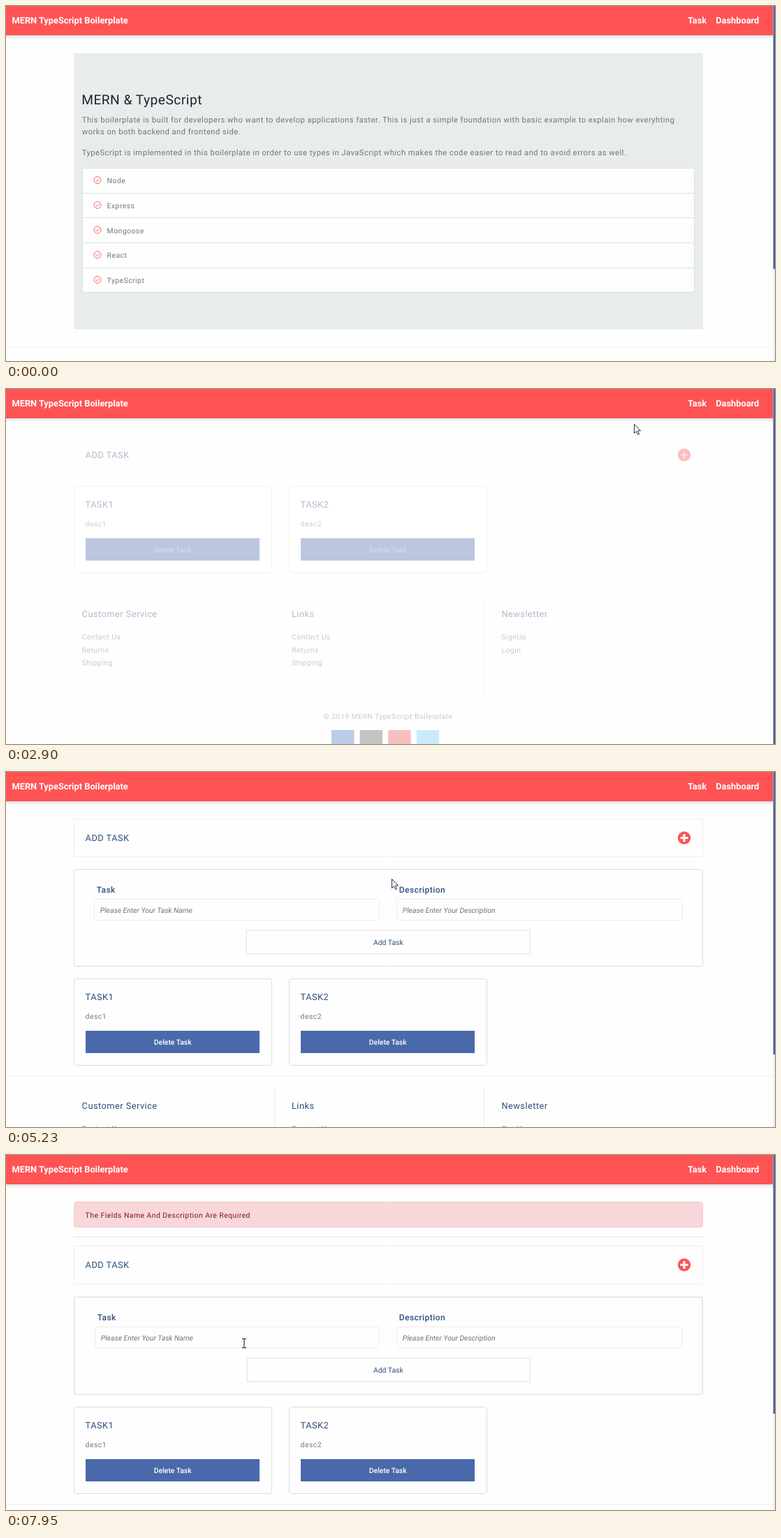
An HTML page with a canvas that plays this animation: 1101x509 px, repeating every 8 s.

```html
<!DOCTYPE html>
<html lang="en">
<head>
<meta charset="utf-8">
<title>MERN TypeScript Boilerplate</title>
<style>
html, body { margin: 0; width: 100%; height: 100%; overflow: hidden; background: #fefefe; }
canvas { display: block; width: 1101px; height: 509px; }
</style>
</head>
<body>
<canvas id="stage" width="1101" height="509"></canvas>
<script>
const ctx = document.getElementById('stage').getContext('2d');
const LOOP = 8000;
const RED = '#ff5354', BLUE = '#4a69ab', NAVY = '#2d4f7c', GRAY = '#757575';
const SPACING = 0.47;

// Moments when the page changes
const PAGE_AT = 2810, FORM_AT = 5090, FORM_SET = 5320, HOVER_AT = 6710, ALERT_AT = 7170;
const CLICKS = [[2450, 2590], [4940, 5020], [5780, 5860], [6940, 7010]];
const CARET = [5860, 6400];

// Pointer legs: first step, last step, number of steps, way points
const LEGS = [
  [260, 650, 6, [[993, 516], [499, 278]]],
  [1030, 1810, 11, [[499, 278], [770, 172], [1019, 74], [1004, 50]]],
  [1890, 2270, 6, [[1004, 50], [990, 26]]],
  [2730, 3520, 11, [[990, 26], [740, 92], [470, 130]]],
  [3680, 3680, 1, [[470, 130], [582, 136]]],
  [3760, 4460, 10, [[582, 136], [958, 101]]],
  [4530, 4764, 4, [[958, 101], [971, 97]]],
  [5090, 5230, 3, [[971, 97], [552, 153]]],
  [5320, 5320, 1, [[552, 153], [498, 162]]],
  [5390, 5700, 5, [[498, 162], [297, 195]]],
  [6550, 6710, 3, [[297, 195], [539, 234]]],
  [7250, 7950, 10, [[539, 234], [341, 270]]]
];

const clamp = v => Math.max(0, Math.min(1, v));
const ramp = (t, from, to) => clamp((t - from) / (to - from));
const smooth = p => p * p * (3 - 2 * p);
const within = (t, [from, to]) => t >= from && t < to;

function text(str, x, y, size, color, { weight = 400, spacing = SPACING, align = 'left', italic = false } = {}) {
  ctx.font = `${italic ? 'italic ' : ''}${weight} ${size}px Roboto, sans-serif`;
  ctx.letterSpacing = spacing + 'px';
  ctx.textAlign = align;
  ctx.fillStyle = color;
  ctx.fillText(str, x, y);
}

function rect(x, y, w, h, color) {
  ctx.fillStyle = color;
  ctx.fillRect(x, y, w, h);
}

function box(x, y, w, h, stroke, { fill = null, radius = 0, line = 1 } = {}) {
  ctx.beginPath();
  ctx.roundRect(x + line / 2, y + line / 2, w - line, h - line, radius);
  if (fill) { ctx.fillStyle = fill; ctx.fill(); }
  ctx.lineWidth = line;
  ctx.strokeStyle = stroke;
  ctx.stroke();
}

function disc(x, y, r, color) {
  ctx.beginPath();
  ctx.arc(x, y, r, 0, Math.PI * 2);
  ctx.fillStyle = color;
  ctx.fill();
}

function polyline(points, color, width) {
  ctx.beginPath();
  points.forEach(([x, y]) => ctx.lineTo(x, y));
  ctx.strokeStyle = color;
  ctx.lineWidth = width;
  ctx.stroke();
}

function faded(alpha, draw) {
  ctx.save();
  ctx.globalAlpha *= alpha;
  draw();
  ctx.restore();
}

function navbar() {
  const shade = ctx.createLinearGradient(0, 42, 0, 48);
  shade.addColorStop(0, 'rgba(0,0,0,0.11)');
  shade.addColorStop(1, 'rgba(0,0,0,0)');
  rect(0, 42, 1098, 6, shade);
  rect(0, 0, 1098, 42, RED);
  const bold = { weight: 700, spacing: 0 };
  text('MERN TypeScript Boilerplate', 8.5, 24.5, 12.8, '#fff', bold);
  text('Task', 976, 24.5, 12.8, '#fff', bold);
  text('Dashboard', 1016.3, 24.5, 12.8, '#fff', bold);
}

function scrollbar(height) {
  rect(1098, 0, 3, 509, '#f0f0f0');
  rect(1098.5, 0, 2.5, height, '#4563a6');
}

function footer(y) {
  rect(0, y - 1, 1098, 1, '#efefef');
  for (const x of [384, 684]) rect(x, y + 16, 1, 151, '#ededed');
  const service = ['Contact Us', 'Returns', 'Shipping'];
  const columns = [['Customer Service', service], ['Links', service], ['Newsletter', ['SignUp', 'Login']]];
  columns.forEach(([title, links], i) => {
    const x = 108.6 + i * 300.4;
    text(title, x, y + 46, 12.8, NAVY);
    links.forEach((link, k) => text(link, x, y + 78 + k * 18.7, 10.4, GRAY));
  });
  text('© 2019 MERN TypeScript Boilerplate', 547, y + 191.5, 10.4, GRAY, { align: 'center' });
  ['#4f79bd', '#626262', '#ea5455', '#76c7f0'].forEach((c, i) => rect(466 + i * 40.6, y + 208, 32.4, 32.4, c));
}

function home() {
  rect(97, 67.5, 901, 396, '#e8ecec');
  text('MERN & TypeScript', 108.2, 140.5, 19.2, '#212529');
  text('This boilerplate is built for developers who want to develop applications faster. This is just a simple foundation with basic example to explain how everyhting',
    108.8, 167, 11.2, GRAY);
  text('works on both backend and frontend side.', 108.8, 184, 11.2, GRAY);
  text('TypeScript is implemented in this boilerplate in order to use types in JavaScript which makes the code easier to read and to avoid errors as well.',
    108.8, 214, 11.2, GRAY);
  box(109, 232, 877, 179, '#dcdfe0', { fill: '#fefefe', radius: 3 });
  ['Node', 'Express', 'Mongoose', 'React', 'TypeScript'].forEach((name, i) => {
    const y = 250 + i * 35.7;
    if (i) rect(109, Math.round(y - 18), 877, 1, '#dcdfe0');
    ctx.beginPath();
    ctx.arc(131, y - 0.4, 5, 0, Math.PI * 2);
    ctx.strokeStyle = RED;
    ctx.lineWidth = 0.9;
    ctx.stroke();
    polyline([[128.4, y - 0.2], [130.3, y + 1.6], [133.6, y - 2.2]], RED, 0.9);
    text(name, 144.6, Math.round(y + 4.3), 10.4, GRAY);
  });
  footer(490);
}

function adder(y) {
  box(97, y, 901, 55, '#efefef');
  text('ADD TASK', 113.6, y + 31.5, 12.8, NAVY);
  disc(971, y + 27.5, 9.2, RED);
  rect(965.5, y + 26, 11, 3, '#fff');
  rect(969.5, y + 22, 3, 11, '#fff');
}

function card(x, y, n) {
  box(x, y, 284, 125, '#dcdcdc', { fill: '#fefefe', radius: 3 });
  text('TASK' + n, x + 16.6, y + 30.5, 12.8, NAVY);
  text('desc' + n, x + 16.6, y + 57.5, 10.4, GRAY);
  rect(x + 17, y + 75, 249, 32, BLUE);
  text('Delete Task', x + 141.7, y + 95, 10.4, '#fff', { weight: 500, spacing: 0, align: 'center' });
}

function form(y, settled, hover, caret) {
  const d = settled ? 1 : 0;
  box(97, y, 901, 140 + d, settled ? '#e2e4e5' : '#dcdcdc', { fill: '#fefefe', radius: 3, line: 1 + d * 0.6 });
  const fields = [
    ['Task', 'Please Enter Your Task Name', 126 + d, 409 - d],
    ['Description', 'Please Enter Your Description', 559, 410 - d]
  ];
  fields.forEach(([label, hint, x, w]) => {
    text(label, x + 3.7, y + 34, 12, NAVY, { weight: 500 });
    box(x, y + 43, w, 31, '#ececec', { radius: 2 });
    text(hint, x + 8.8, y + 63, 10.4, '#6c757d', { spacing: 0, italic: true });
  });
  if (caret) rect(136, y + 52, 1, 15, '#333');
  box(343 + d, y + 87, 408 - d, 36, '#eeeeee', { fill: '#fefefe', line: 2 });
  if (hover) faded(hover, () => rect(346, y + 89, 403.5, 32.5, RED));
  text('Add Task', 547.3, y + 108.7, 10.4, hover > 0.4 ? '#fff' : NAVY, { spacing: 0, align: 'center' });
}

function alertBar(alpha) {
  rect(97, 117, 901, 1, '#e3e3e3');
  faded(alpha, () => {
    box(97, 67, 901, 37, '#f5c6cb', { fill: '#f8d7da', radius: 3 });
    text('The Fields Name And Description Are Required', 113.6, 89.5, 10.4, '#721c24');
  });
}

function tasks(t) {
  const alerted = t >= ALERT_AT, open = t >= FORM_AT, settled = t >= FORM_SET;
  const shift = alerted ? 64 : 0;
  if (alerted) alertBar(smooth(ramp(t, ALERT_AT, 7700)));
  adder(alerted ? 130 : 67);
  if (open) {
    const hover = t < HOVER_AT ? 0 : 1 - ramp(t, ALERT_AT, 7420);
    faded(0.25 + 0.75 * ramp(t, FORM_AT, 5230), () => form(139 + shift, settled, hover, within(t, CARET)));
  }
  const top = 139 + shift + (open ? 157 : 0) + (settled ? 1 : 0);
  card(97, top, 1);
  card(405, top, 2);
  footer(top + 142 - (open ? 1 : 0));
}

function pointerAt(t) {
  let pos = null;
  for (const [from, to, steps, path] of LEGS) {
    if (t < from) break;
    const gap = (to - from) / Math.max(1, steps - 1) || 1;
    const step = Math.min(steps, Math.floor((t - from) / gap + 1e-6) + 1);
    const p = smooth(step / steps) * (path.length - 1);
    const i = Math.min(path.length - 2, Math.floor(p));
    const [a, b] = [path[i], path[i + 1]];
    pos = a.map((v, k) => Math.round(v + (b[k] - v) * (p - i)));
  }
  return pos;
}

function pointerKind(t, x, y) {
  const over = (l, top, r, bottom) => x > l && x < r && y > top && y < bottom;
  if (over(970, 8, 1085, 34)) return 'hand';
  if (t < PAGE_AT) return 'arrow';
  const shift = t >= ALERT_AT ? 64 : 0;
  if (Math.hypot(x - 971, y - 94.5 - shift) < 10) return 'hand';
  if (t < FORM_AT) return 'arrow';
  if (over(343, 226 + shift, 751, 262 + shift)) return 'hand';
  if (over(127, 182 + shift, 535, 213 + shift) || over(559, 182 + shift, 968, 213 + shift)) return 'beam';
  return 'arrow';
}

const SHAPES = {
  arrow: 'M.5 .5V13.5L3.5 10.7L5.6 15.5L7.7 14.6L5.6 9.8H9.6Z',
  hand: 'M-.5 12V1.8Q-.5 .5 .8 .5Q2.2 .5 2.2 1.8V6.6Q3.6 5.6 4.6 7.2Q6.2 6.4 6.8 8Q8.6 7.6 8.6 9.4V13L7 16.4V18.5H-.2V16.5L-4.4 11.2Q-4.6 9.2 -2.8 9.6Z',
  beam: 'M-3 -6.5H-1L0 -6L1 -6.5H3M0 -6V6M-3 6.5H-1L0 6L1 6.5H3'
};
for (const k in SHAPES) SHAPES[k] = new Path2D(SHAPES[k]);

function pointer(t) {
  const pos = pointerAt(t);
  if (!pos) return;
  const [x, y] = pos;
  const kind = pointerKind(t, x, y);
  if (CLICKS.some(span => within(t, span))) disc(x, y, 10, 'rgba(255,255,0,0.47)');
  ctx.save();
  ctx.translate(x, y);
  if (kind !== 'beam') {
    ctx.fillStyle = '#fff';
    ctx.fill(SHAPES[kind]);
  }
  ctx.strokeStyle = kind === 'arrow' ? '#2a2f45' : '#111';
  ctx.lineWidth = 1;
  ctx.lineJoin = 'round';
  ctx.stroke(SHAPES[kind]);
  if (kind === 'hand') for (const k of [2.2, 4.6, 6.8]) polyline([[k, 7.5], [k, 10.5]], '#111', 0.7);
  ctx.restore();
}

function thumb(t) {
  if (t < PAGE_AT) return 377;
  if (t < FORM_AT) return 509;
  return t < ALERT_AT ? 405 : 371;
}

function render(t) {
  rect(0, 0, 1101, 509, '#fefefe');
  if (t < PAGE_AT) home();
  else faded(0.15 + 0.85 * ramp(t, PAGE_AT, 3150), () => tasks(t));
  navbar();
  scrollbar(thumb(t));
  pointer(t);
}

ctx.textRendering = 'geometricPrecision';
const start = performance.now();
function tick() {
  render((performance.now() - start) % LOOP);
  requestAnimationFrame(tick);
}
tick();
</script>
</body>
</html>
```
